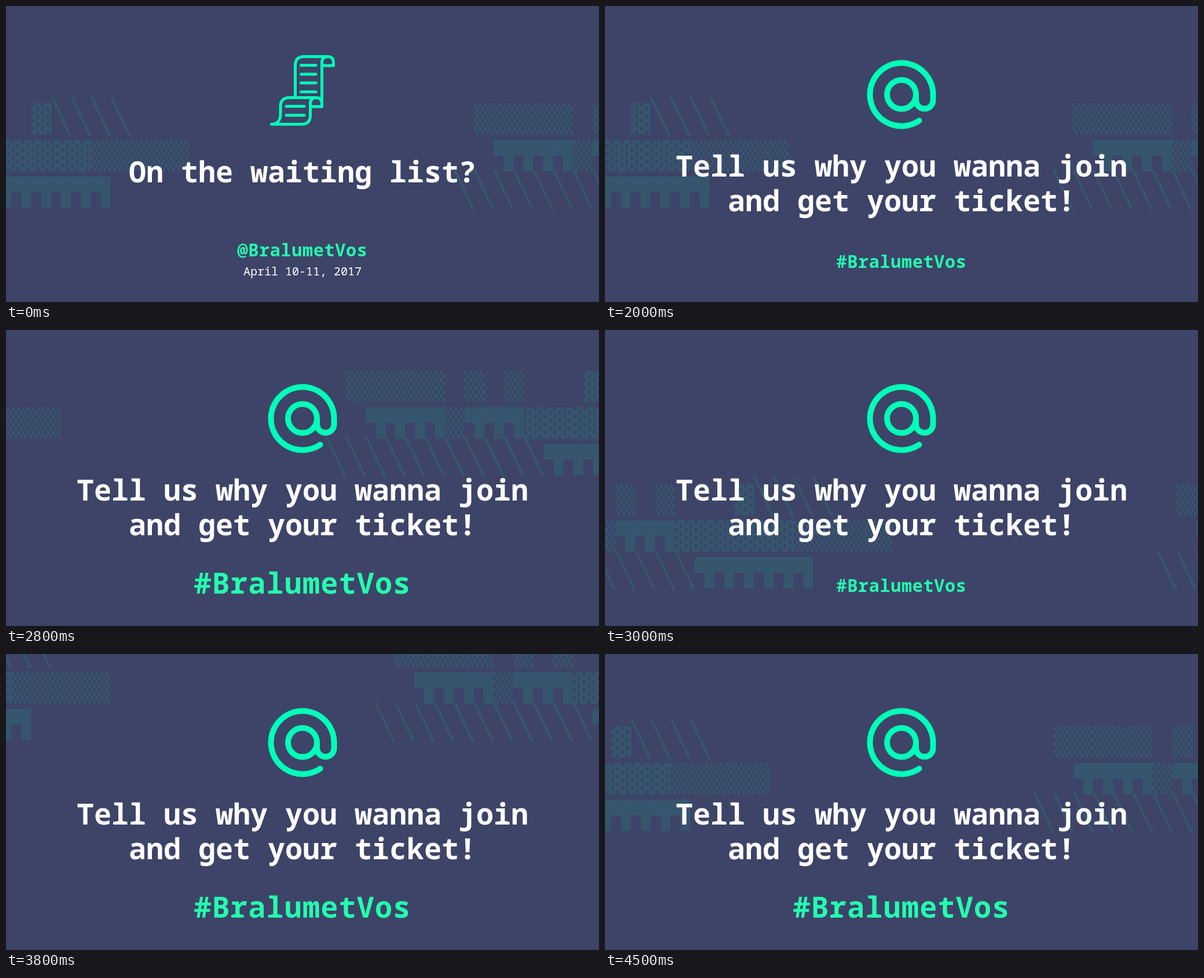
Animation of 1024 by 512 pixels, one loop 5 s. Source, as an HTML page with a canvas:

```html
<!DOCTYPE html>
<html lang="en">
<head>
<meta charset="utf-8">
<title>Waiting list</title>
<style>
  html, body { margin: 0; width: 100%; height: 100%; overflow: hidden; background: #3d4468; }
  canvas { display: block; }
</style>
</head>
<body>
<canvas id="stage" width="1024" height="512"></canvas>
<script>
const ctx = document.getElementById("stage").getContext("2d");
const NAVY = "#3d4468", TEAL = "#36566e", MINT = "#00ffb9", TAG = "#24ffaf";
const TILE_W = 34.17, TILE_H = 54.5, ROW_PITCH = 63.4, STRIP_PERIOD = 1174;

// Each tile painter fills one character cell of the background strip.
function cells(x, y, filled) {
  const w = TILE_W / 8, h = TILE_H / 8;
  for (let r = 0; r < 8; r++)
    for (let c = 0; c < 8; c++)
      if (filled(r, c)) ctx.rect(x + c * w, y + r * h, w, h);
}
const tiles = {
  checker: (x, y) => cells(x, y, (r, c) => (r + c) % 2 === 0),
  dots: (x, y) => cells(x, y, (r, c) => c % 4 !== (r % 2) * 2),
  comb(x, y) {
    const w = TILE_W - 0.25;
    ctx.rect(x, y, w, TILE_H / 2);
    ctx.rect(x + w / 2, y + TILE_H / 2, w / 2, TILE_H / 2);
  },
  slash(x, y) {
    ctx.moveTo(x - 1.5, y - 11);
    ctx.lineTo(x + 3.5, y - 11);
    ctx.lineTo(x + 35.7, y + 57);
    ctx.lineTo(x + 30.7, y + 57);
    ctx.closePath();
  }
};

// Runs of equal tiles: row, kind, first column, count.
const runs = [
  [0, "checker", 0, 5], [0, "checker", 6, 1], [0, "checker", 8, 1],
  [0, "dots", 12, 1], [0, "slash", 13, 4],
  [1, "comb", 1, 4], [1, "checker", 5, 1], [1, "comb", 6, 3],
  [1, "dots", 9, 6], [1, "checker", 15, 5],
  [2, "slash", -1, 11], [2, "comb", 10, 6]
];

function drawStrip(left, top) {
  ctx.fillStyle = TEAL;
  ctx.beginPath();
  for (const x0 of [left - STRIP_PERIOD, left])
    for (const [row, kind, first, count] of runs)
      for (let i = first; i < first + count; i++)
        tiles[kind](x0 + i * TILE_W, top + row * ROW_PITCH);
  ctx.fill();
}

const scroll = new Path2D(
  "M499.5 158V103Q499.5 87.5 515 87.5H555Q565.5 87.5 565.5 98V103H545.5" +
  "M556 87.5Q545.5 87.5 545.5 98V174H525.5" +
  "M458.5 204.5C469 204.5 474 197 474 187V174Q474 158.5 489.5 158.5H535Q545.5 158.5 545.5 169" +
  "M536 158.5Q525.5 158.5 525.5 169V189Q525.5 204.5 510 204.5H458.5" +
  "M509.5 102.5H535M509.5 118H535M509.5 133H535M509.5 148.5H535" +
  "M484 173.5H515M484 189H515");
const atSign = new Path2D(
  "M542.5 198.3A54.5 54.5 0 1 1 566.5 153V163A14.75 14.75 0 0 1 537 163V153" +
  "A25 25 0 1 0 487 153A25 25 0 1 0 537 153");

function drawIcon(path, width) {
  ctx.strokeStyle = MINT;
  ctx.lineWidth = width;
  ctx.lineCap = ctx.lineJoin = "round";
  ctx.stroke(path);
}

function write(text, baseline, size, color = "#fff", weight = 700, spacing = 0) {
  ctx.font = `${weight} ${size}px "Roboto Mono", "Noto Sans Mono", monospace`;
  ctx.letterSpacing = spacing * size + "px";
  ctx.fillStyle = color;
  ctx.fillText(text, 512 - text.length * size * (0.6 + spacing) / 2, baseline);
}
const writeTag = (text, baseline, size) => write(text, baseline, size, TAG, 700, 0.025);

// Strip offsets for each half-second step of the second scene.
const jumps = [[0, 0], [-221, -98], [179, 98], [-137, -200], [80, 98], [-33, -43]];

function draw() {
  const time = performance.now() % 5000;
  const step = Math.floor((time - 2000) / 500);
  const [dx, dy] = jumps[Math.max(0, step)];

  ctx.fillStyle = NAVY;
  ctx.fillRect(0, 0, 1024, 512);
  ctx.fillStyle = "#383f60";
  ctx.fillRect(0, 511, 1024, 1);
  drawStrip(808 + dx, 168 + dy);

  if (time < 2000) {
    drawIcon(scroll, 5);
    write("On the waiting list?", 305, 50);
    writeTag("@BralumetVos", 433, 30);
    write("April 10-11, 2017", 466, 20, "#fff", 300);
  } else {
    drawIcon(atSign, 10);
    write("Tell us why you wanna join", 295, 50);
    write("and get your ticket!", 355, 50);
    if (step % 2) writeTag("#BralumetVos", 456, 50);
    else writeTag("#BralumetVos", 453, 30);
  }
  requestAnimationFrame(draw);
}
draw();
</script>
</body>
</html>
```
